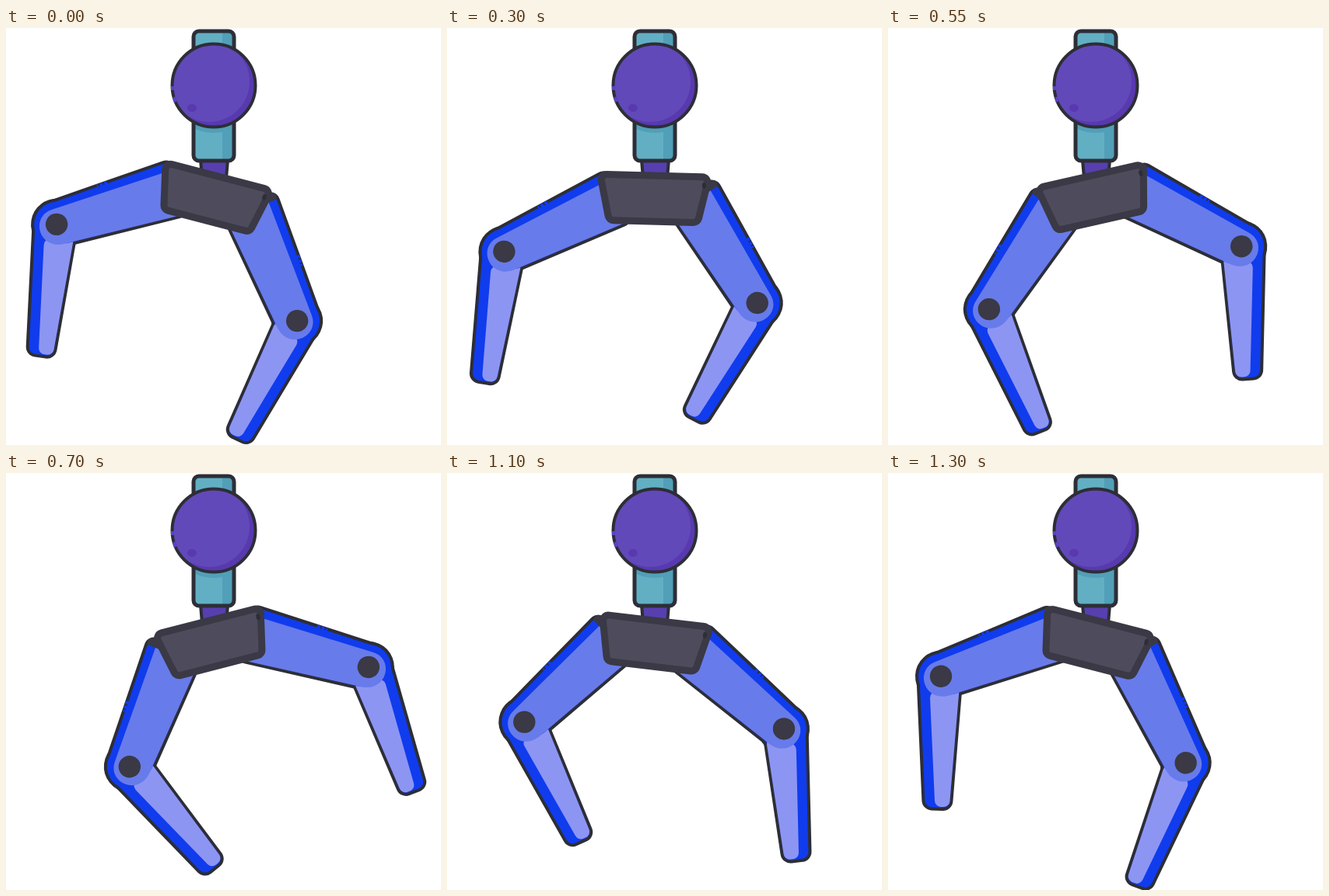
Animation, 559 px wide and 537 px high, one loop 1350 ms. Source, as an HTML page with a canvas:

```html
<!DOCTYPE html>
<html>
<head>
<meta charset="utf-8">
<style>
html, body { margin: 0; width: 100%; height: 100%; overflow: hidden; background: #fff; }
canvas { display: block; }
</style>
</head>
<body>
<canvas id="stage" width="559" height="537"></canvas>
<script>
const ctx = document.getElementById('stage').getContext('2d');
const LOOP = 1350, STEP = 50, RAD = Math.PI / 180;
const REACH = 151.7; // shoulder to elbow
const INK = '#2d2e36', EDGE = '#3a3945', BLUE = '#103cee', UPPER = '#687bea', FORE = '#8d95f3';

function rounded(points, r) {
  const path = new Path2D(), n = points.length;
  const [a, b] = [points[n - 1], points[0]];
  path.moveTo((a[0] + b[0]) / 2, (a[1] + b[1]) / 2);
  points.forEach((p, i) => path.arcTo(...p, ...points[(i + 1) % n], r));
  path.closePath();
  return path;
}

function disc(x, y, rx, ry = rx) {
  const path = new Path2D();
  path.ellipse(x, y, rx, ry, 0, 0, 7);
  return path;
}

function box(x, y, w, h, r) {
  const path = new Path2D();
  path.roundRect(x, y, w, h, r);
  return path;
}

function fill(path, color) {
  ctx.fillStyle = color;
  ctx.fill(path);
}

function stroke(path, color, width) {
  ctx.strokeStyle = color;
  ctx.lineWidth = width;
  ctx.stroke(path);
}

function within(place, draw) {
  ctx.save();
  place();
  draw();
  ctx.restore();
}

const upper = rounded([[-35, -12], [35, -12], [27, REACH], [-28, REACH + 6]], 9);
const cap = rounded([[-36, -13], [20, -13], [20, -3], [-36, -3]], 4);
const upperLight = new Path2D(
  `M-24-6L-20 ${REACH}C-20 182 27 184 27 147L35-6Z`);
const fore = rounded([[-28, -4], [26, -4], [24, 14], [18.5, 169], [-12.5, 169]], 9);
const foreLight = rounded([[-13, 25], [0, 10], [24.5, 10], [18.5, 168], [0, 168]], 8);
const elbow = disc(0, 0, 29);
const glint = new Path2D('M-33 74L-32 88');
const plate = rounded([[-69, -27], [71, -27], [58, 32], [-56, 32]], 7);
const ball = disc(267, 74, 53.5);
const shaft = box(241, 4, 52, 167, 7);

function arm(side, swing, bend) {
  const toElbow = () => { ctx.translate(0, REACH); ctx.rotate(-bend * RAD); };
  within(() => {
    ctx.scale(side, 1);
    ctx.translate(-55, 6);
    ctx.rotate(swing * RAD);
  }, () => {
    stroke(upper, INK, 8);
    within(toElbow, () => {
      stroke(fore, INK, 8);
      stroke(elbow, INK, 8);
      fill(fore, BLUE);
      fill(elbow, BLUE);
      fill(foreLight, FORE);
    });
    fill(upper, BLUE);
    fill(upperLight, UPPER);
    fill(cap, EDGE);
    ctx.setLineDash([4, 2]);
    stroke(glint, BLUE, 4);
    ctx.setLineDash([]);
    fill(disc(0, REACH, 14.2), EDGE);
  });
}

function mount() {
  const neck = new Path2D('M250 170H285L282 205H253Z');
  fill(neck, '#573fb0');
  stroke(neck, INK, 4);
}

function head() {
  fill(shaft, '#62afc3');
  within(() => ctx.clip(shaft), () => {
    fill(box(278, 0, 20, 180, 0), '#519fb8');
    fill(disc(267, 78, 57), '#519fb8');
  });
  stroke(shaft, INK, 5);
  fill(ball, '#5839b0');
  within(() => ctx.clip(ball), () => fill(disc(261, 69, 52), '#6249b9'));
  fill(disc(239, 103, 6, 5), '#5839b0');
  stroke(ball, INK, 4);
  stroke(new Path2D('M214 75V80M216 89L218 95'), '#5a40c8', 4);
}

function draw(t) {
  const wave = peak => Math.cos(2 * Math.PI * (t - peak) / LOOP);
  ctx.clearRect(0, 0, 559, 537);
  ctx.lineJoin = 'round';
  mount();
  within(() => {
    ctx.translate(265, 217);
    ctx.rotate(14.7 * wave(-15) * RAD);
  }, () => {
    const swing = 17 * wave(190), flex = 9 * wave(1090);
    arm(1, 47.7 + swing, 62 + flex);
    arm(-1, 47.7 - swing, 51.2 - flex);
    fill(plate, '#4e4b5c');
    stroke(plate, EDGE, 9);
    fill(disc(65, -16, 2.5, 4), INK);
  });
  head();
}

const start = performance.now();
function tick() {
  const t = (performance.now() - start) % LOOP;
  draw(Math.floor(t / STEP) * STEP);
  requestAnimationFrame(tick);
}
tick();
</script>
</body>
</html>
```
